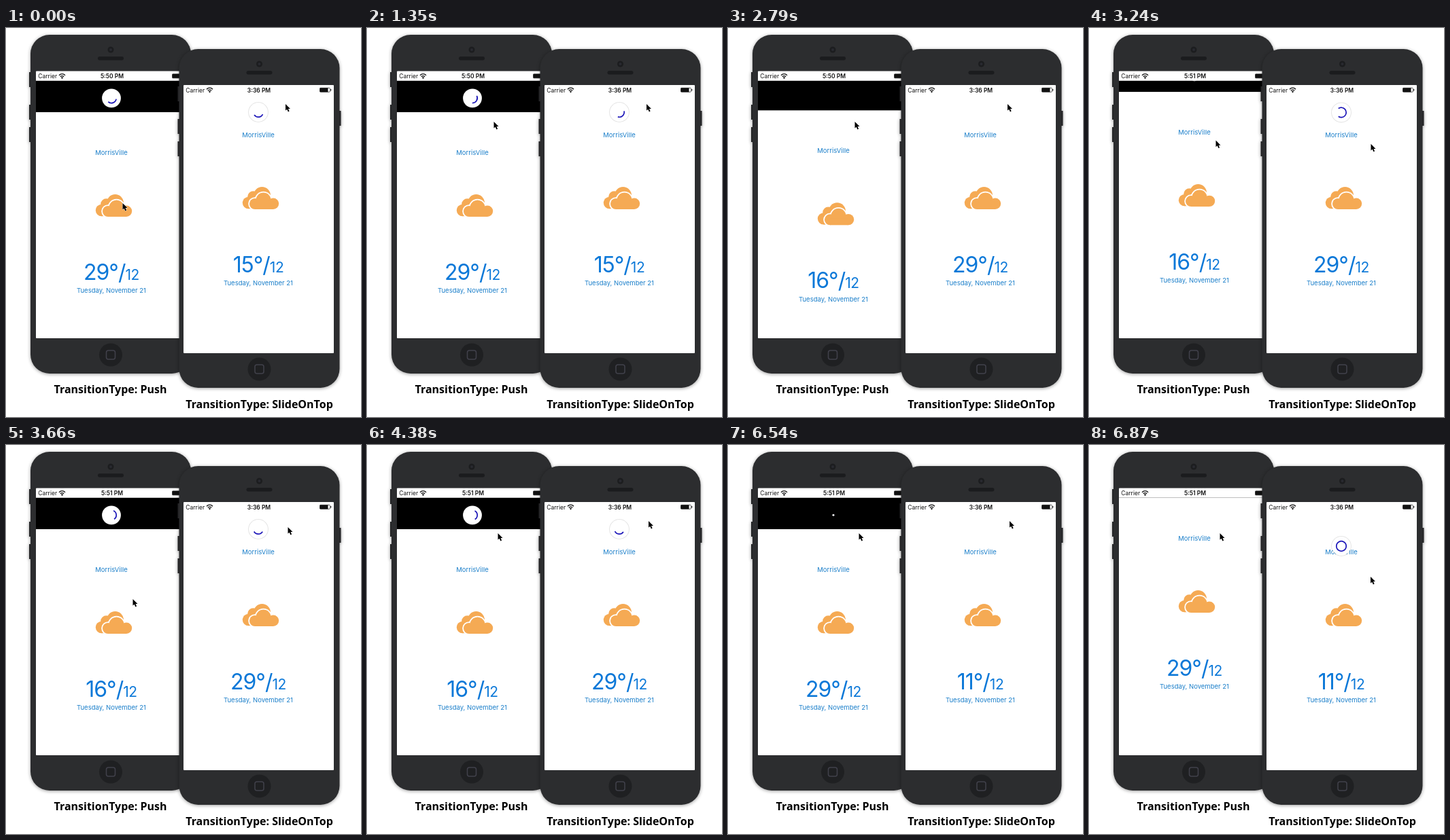
These frames come from a looping animation (522x573 px, 6900 ms). An HTML page:

```html
<!DOCTYPE html>
<html lang="en">
<head>
<meta charset="utf-8">
<title>Pull to refresh transitions</title>
<style>
  html, body { margin: 0; width: 100%; height: 100%; overflow: hidden; background: #fff; }
  svg { display: block; width: 522px; height: 573px; font-family: Inter, Roboto, sans-serif; }
  .label { font: 700 16px "Open Sans", "Noto Sans", sans-serif; text-anchor: middle; }
  .status { font-size: 8.5px; fill: #111; }
  .clock { font-weight: 600; text-anchor: middle; }
  .weather text { text-anchor: middle; }
  .small { font-size: 9.5px; fill: #1b7fca; }
  .temp { font-size: 32px; letter-spacing: -1px; fill: #0b78d8; }
  .temp .low { font-size: 21px; letter-spacing: -.4px; }
</style>
</head>
<body>
<svg viewBox="0 0 522 573">
  <defs>
    <filter id="shadow" x="-10%" y="-10%" width="120%" height="120%" color-interpolation-filters="sRGB">
      <feDropShadow dx="0" dy="1" stdDeviation="2.5" flood-color="#000" flood-opacity=".4"/>
    </filter>
    <g id="body">
      <g filter="url(#shadow)">
        <path d="M34 65h4v22h-4zM34 113h4v22h-4zM34 146h4v22h-4zM270 101h4v22h-4z" fill="#242527"/>
        <rect x="36" y="10" width="236" height="499" rx="28" fill="#2c2d2f"/>
      </g>
      <circle cx="154" cy="32" r="4.5" fill="#1c1d1f"/>
      <circle cx="154" cy="32" r="2" fill="#292a30"/>
      <rect x="135" y="42" width="38" height="5.5" rx="2.7" fill="#1b1c1e"/>
      <circle cx="154" cy="481.5" r="17" fill="#1f2022"/>
      <rect x="147.5" y="475" width="13" height="13" rx="3" fill="none" stroke="#41414b" stroke-width="1.5"/>
    </g>
    <g id="bar">
      <path d="M34 6.200a6 6 0 0 1 9 0M35.800 8.200a3.800 3.800 0 0 1 5.400 0" fill="none" stroke="#111" stroke-width="1.3"/>
      <path d="M38.500 11.500l-1.700-1.900a2.400 2.400 0 0 1 3.400 0z" fill="#111"/>
      <rect x="200.500" y="4.300" width="15" height="6" rx="1.200" fill="none" stroke="#333" stroke-width=".8"/>
      <path d="M200.500 4.300h12v6h-12zM216.300 6h1v2.500h-1z" fill="#111"/>
    </g>
    <g id="frontCloud">
      <circle cx="-8.500" cy="8" r="8"/><circle cx="4" cy="2.500" r="11"/><circle cx="18.500" cy="7.800" r="8.200"/>
      <path d="M-8.500 6h27v10h-27z"/>
    </g>
    <g id="cloud" fill="#f5aa54">
      <circle cx="-18" cy="6.500" r="8.700"/><circle cx="-11" cy="-2.500" r="8.300"/><circle cx="2" cy="-4.500" r="12.500"/>
      <path d="M-18 2h20v13.200h-20z"/>
      <use href="#frontCloud" fill="#fff" stroke="#fff" stroke-width="3.600"/>
      <use href="#frontCloud"/>
    </g>
    <path id="arrow" d="M-.500 0v9.600l2.200-1.900 1.700 3.700 1.700-.8-1.600-3.500h3z" fill="#000" stroke="#fff" stroke-width=".9" paint-order="stroke"/>
    <clipPath id="leftClip"><rect x="44" y="77.500" width="221" height="379.500"/></clipPath>
    <clipPath id="rightClip"><rect x="261" y="98" width="221" height="381"/></clipPath>
  </defs>
  <rect width="522" height="573" fill="#fff"/>
  <g id="left"></g>
  <g id="right"></g>
  <text class="label" x="153.500" y="538">TransitionType: Push</text>
  <text class="label" x="372.500" y="560">TransitionType: SlideOnTop</text>
</svg>
<script>
const LOOP = 6900;
const SPIN = 0.505;      // degrees per ms
const HEADER = 46;       // header height while refreshing
const SHRINK = 290;      // ms for the spinner to vanish

function buildPhone(id, { dx, dy, x, y, height, mid }) {
  const root = document.getElementById(id);
  root.innerHTML = `
    <use href="#body" x="${dx}" y="${dy}"/>
    <rect x="${x}" y="${y}" width="221" height="${height}" rx="1" fill="#fff"/>
    <g class="status">
      <text x="${x + 3.3}" y="${y + 10.5}">Carrier</text>
      <text class="clock" x="${mid + 1}" y="${y + 10.5}">3:36 PM</text>
    </g>
    <use href="#bar" x="${x}" y="${y}"/>
    <g clip-path="url(#${id}Clip)">
      <rect class="header" x="${x}" y="77.5" width="221" height="0"/>
      <g class="weather">
        <text class="city small" x="${mid}">MorrisVille</text>
        <g class="details">
          <use href="#cloud" x="${mid + 3.5}" y="262"/>
          <text class="temp" x="${mid}" y="370.7"><tspan class="high"></tspan><tspan class="low">12</tspan></text>
          <text class="small" x="${mid}" y="390.4">Tuesday, November 21</text>
        </g>
      </g>
      <g class="spinner">
        <circle r="14.2" fill="none" stroke="#000" stroke-opacity=".1" stroke-width="1.6"/>
        <circle r="13.9" fill="#fff"/>
        <path class="arc" fill="none" stroke="#1a14b8" stroke-width="1.7"/>
      </g>
    </g>
    <use class="cursor" href="#arrow"/>`;
  const part = name => root.querySelector("." + name);
  return {
    mid, clock: part("clock"), header: part("header"), city: part("city"), details: part("details"),
    high: part("high"), spinner: part("spinner"), arc: part("arc"), cursor: part("cursor")
  };
}

const left = buildPhone("left", { dx: 0, dy: 0, x: 44, y: 63.5, height: 393.5, mid: 155 });
const right = buildPhone("right", { dx: 218.5, dy: 21, x: 261, y: 84, height: 395, mid: 371 });

// Eased progress from 0 to 1.
function ramp(t, start, duration) {
  const x = Math.min(1, Math.max(0, (t - start) / duration));
  return x * x * (3 - 2 * x);
}

const move = (el, x, y, scale = 1) =>
  el.setAttribute("transform", `translate(${x} ${y}) scale(${scale})`);

function arcPath(centre, sweep, r = 7.2) {
  const span = Math.min(sweep, 359.9);
  const point = deg => {
    const a = deg * Math.PI / 180;
    return `${(r * Math.cos(a)).toFixed(2)} ${(r * Math.sin(a)).toFixed(2)}`;
  };
  return `M${point(centre - span / 2)}A${r} ${r} 0 ${span > 180 ? 1 : 0} 1 ${point(centre + span / 2)}`;
}

function drawSpinner(phone, y, scale, centre, sweep = 120) {
  phone.spinner.style.display = scale > 0.01 ? "" : "none";
  move(phone.spinner, phone.mid, y, scale);
  phone.arc.setAttribute("d", arcPath(centre, sweep));
}

function drawLeft(t) {
  const grab = 3130, release = 3500;
  const closing = ramp(t, 2750, 280), dragged = ramp(t, grab, 300), leaving = ramp(t, 3800, 500);
  const pull = HEADER * (1 - closing - ramp(t, 6545, 290)) + 52 * dragged - 6 * ramp(t, release, 90);
  const pulling = t >= grab && t < release;
  const relaxed = t >= 2750 && t < release || t >= 6545;

  left.clock.textContent = t < 3200 ? "5:50 PM" : "5:51 PM";
  left.high.textContent = t < 2460 || t >= 6310 ? "29°/" : "16°/";
  left.header.setAttribute("height", pull + 0.5);
  left.city.setAttribute("y", 140.8 + pull);
  move(left.details, 0, pull - HEADER + (relaxed ? 15 : 0));

  const progress = Math.min(1, pull / HEADER);
  const y = 57.3 + pull;
  if (pulling) drawSpinner(left, y, progress, 0, 360 * progress);
  else if (t < grab) drawSpinner(left, y, 1 - ramp(t, 2460, SHRINK), 70 + SPIN * t);
  else drawSpinner(left, y, 1 - ramp(t, 6310, SHRINK), SPIN * (t - 3660) - 5);

  const wander = ramp(t, 200, 450);
  move(left.cursor, 172 + 15 * wander + 6 * leaving, 258 - 120 * wander + 89 * dragged - 97 * leaving);
}

function drawRight(t) {
  const grab = 3050, release = 3420, secondGrab = 6620;
  const dragged = ramp(t, grab, 300), dragAgain = ramp(t, secondGrab, 250);
  right.high.textContent = t < 2460 ? "15°/" : t < 6230 ? "29°/" : "11°/";
  right.city.setAttribute("y", 160.8);
  move(right.details, 0, -11);

  const hidden = 67, rest = 124;
  const pullRing = progress => drawSpinner(right, hidden + 82 * progress, 1, 0, 360 * progress);
  if (t < grab) drawSpinner(right, rest, 1 - ramp(t, 2460, SHRINK), 85 + SPIN * t);
  else if (t < release) pullRing(dragged);
  else if (t < secondGrab)
    drawSpinner(right, rest + 25 * (1 - ramp(t, release, 120)), 1 - ramp(t, 6230, SHRINK), 90 + SPIN * (t - 3660));
  else pullRing(dragAgain);

  const returned = ramp(t, release, 220), settled = ramp(t, 3800, 300);
  move(right.cursor, 411.5 + 3.5 * ramp(t, 2920, 130) - 0.5 * settled,
    112 + 84 * dragged - 75 * returned - 9 * settled + 82 * dragAgain);
}

function frame(now) {
  const t = now % LOOP;
  drawLeft(t);
  drawRight(t);
  requestAnimationFrame(frame);
}

frame(0);
</script>
</body>
</html>
```
